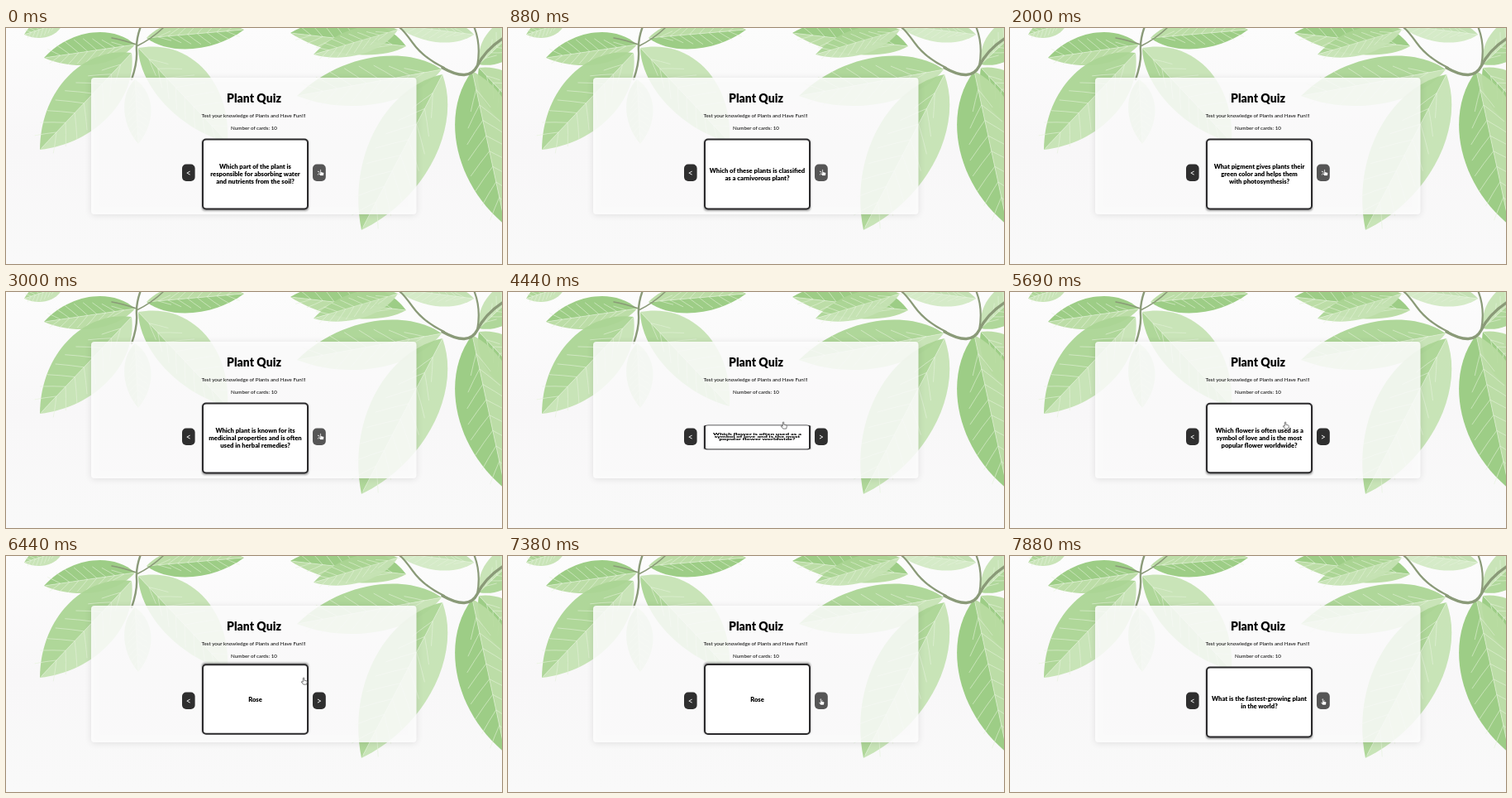
These frames come from a looping animation (600 px wide and 285 px high, 8000 ms). An HTML page:

```html
<!DOCTYPE html>
<html lang="en">
<head>
<meta charset="utf-8">
<title>Plant Quiz</title>
<style>
  html, body { margin: 0; width: 100%; height: 100%; overflow: hidden; background: #f9f8f9; }
  svg { display: block; width: 600px; height: 285px; }
  text { font-family: Lato, "Open Sans", sans-serif; text-anchor: middle; fill: #000; }
  .title { font-size: 14px; font-weight: 900; }
  .info { font-size: 6.25px; }
  .card text { font-size: 7.65px; font-weight: 900; }
  .btn rect { fill: #2f2f2f; }
  .btn.hover rect { fill: #565656; }
  .btn text { fill: #fff; font-size: 10.5px; }
</style>
</head>
<body>
<svg viewBox="0 0 600 285">
  <defs>
    <linearGradient id="sky" x2="0" y2="1">
      <stop offset="0" stop-color="#fcfcfc"/>
      <stop offset=".5" stop-color="#f8f7f8"/>
      <stop offset="1" stop-color="#f9f9f9"/>
    </linearGradient>
    <filter id="soft" x="-10%" y="-20%" width="120%" height="140%"><feGaussianBlur stdDeviation="4"/></filter>
    <filter id="lift" x="-10%" y="-10%" width="120%" height="120%"><feGaussianBlur stdDeviation="1.1"/></filter>
  </defs>
  <rect width="600" height="285" fill="url(#sky)"/>
  <g id="leaves"></g>
  <g fill="none" stroke="#8a9a78" stroke-linecap="round">
    <path stroke-width="2.4" d="M163 -2Q157 14 158 28T152 62"/>
    <path stroke-width="1.6" d="M158 22Q175 14 190 0M158 20Q140 14 128 12"/>
    <path stroke-width="3.4" d="M602 12Q580 26 570 46T528 48"/>
    <path stroke-width="2.2" d="M530 48Q505 36 492 18T474 -2M570 46Q575 20 566 -2"/>
  </g>
  <rect x="103" y="61" width="393.5" height="165" rx="4" fill="#000" opacity=".1" filter="url(#soft)"/>
  <rect x="103" y="60" width="393.5" height="165" rx="4" fill="#fff" opacity=".84"/>
  <text class="title" x="300" y="90.3">Plant Quiz</text>
  <text class="info" x="299.7" y="108.2">Test your knowledge of Plants and Have Fun!!!</text>
  <text class="info" x="300" y="123.2">Number of cards: 10</text>
  <g class="btn"><rect x="213" y="164.5" width="15.6" height="20.5" rx="5"/><text x="220.8" y="178.6">&lt;</text></g>
  <g class="btn" id="next"><rect x="371" y="164.5" width="15.8" height="20.5" rx="5"/><text x="378.9" y="178.6">&gt;</text></g>
  <g class="card" id="card">
    <rect x="-64.5" y="-40" width="129" height="86" rx="4" opacity=".4" filter="url(#lift)"/>
    <rect x="-63.5" y="-40.25" width="127" height="84" rx="4" fill="#fff" stroke="#2b2a2c" stroke-width="2"/>
    <g id="front"></g>
    <g id="back" transform="scale(1 -1)"><text y="1">Rose</text></g>
  </g>
  <path id="hand" fill="#fff" stroke="#444" stroke-width=".7" stroke-linejoin="round"
    d="M-1.7 -3.6q.8-.9 1.5 0v2.8l2.8.7q.9.3.7 1.4l-.6 2.8h-4l-2.5-3.1q.6-1 2.1.2z"/>
</svg>
<script>
const LOOP = 8000, STEP = 62.5, AXIS = 174.75, FLIP = 600;
const $ = id => document.getElementById(id);

// base x, base y, tip x, tip y, side widths, tone
const LEAVES = [
  [70, -8, 22, 8, .3, .3, 1],
  [156, 62, 160, 140, .3, .25, 2],
  [156, 20, 46, 36, .2, .26, 0],
  [152, 30, 41, 147, .27, .3, 1],
  [170, 12, 288, 2, .2, .2, 0],
  [160, 24, 268, 138, .34, .2, 1],
  [484, 22, 344, 6, .16, .24, 0],
  [474, 2, 372, 32, .2, .2, 1],
  [566, 8, 470, -4, .2, .2, 2],
  [572, 44, 640, -20, .3, .3, 1],
  [527, 50, 352, 82, .2, .22, 1],
  [528, 56, 430, 244, .24, .26, 1],
  [572, 48, 650, 130, .3, .3, 0],
  [564, 52, 604, 238, .27, .26, 0]
];
const TONES = [['#b9dca2', '#98cb7f'], ['#c6e3b4', '#abd594'], ['#d3eac5', '#c1e0b0']];

function leaf([x, y, tx, ty, a, b, tone]) {
  const len = Math.hypot(tx - x, ty - y);
  const turn = Math.atan2(ty - y, tx - x) * 180 / Math.PI;
  const half = w => `M0 0C${.22 * len} ${w * len} ${.68 * len} ${w * len} ${len} 0Z`;
  let veins = `M0 0H${len * .98}`;
  for (let u = .12; u < .85; u += .1) {
    const reach = 2.3 * u * (1 - u);
    for (const w of [-a, b])
      veins += `M${u * len} 0q${.06 * len} ${w * reach * len * .5} ${.13 * len} ${w * reach * len}`;
  }
  const [light, dark] = TONES[tone];
  return `<g transform="translate(${x} ${y}) rotate(${turn})" opacity=".94">
    <path d="${half(-a)}" fill="${light}"/><path d="${half(b)}" fill="${dark}"/>
    <path d="${veins}" fill="none" stroke="#e3f2d8" stroke-width=".8" opacity=".7"/></g>`;
}
$('leaves').innerHTML = LEAVES.map(leaf).join('');

const CARDS = [
  [0, 'Which part of the plant is|responsible for absorbing water|and nutrients from the soil?'],
  [875, 'Which of these plants is classified|as a carnivorous plant?'],
  [1437, 'What is the process by which|plants use sunlight to make|their own food called?'],
  [2000, 'What pigment gives plants their|green color and helps them|with photosynthesis?'],
  [2562, 'Which part of the plant is|responsible for producing|seeds and fruit?'],
  [3000, 'Which plant is known for its|medicinal properties and is often|used in herbal remedies?'],
  [3500, 'Which flower is often used as a|symbol of love and is the most|popular flower worldwide?'],
  [7375, 'What is the fastest-growing plant|in the world?']
];
const FLIPS = [4293, 5233, 5983, 7358];
const PATH = [
  [0, 381.5, 174.5], [3600, 381.5, 174.5], [4125, 334, 161], [6240, 334, 161],
  [6437, 361, 151], [6750, 374, 166], [7100, 379.5, 176], [LOOP, 379.5, 176]
];

// CSS "ease" curve
function ease(x) {
  if (x <= 0 || x >= 1) return x <= 0 ? 0 : 1;
  let lo = 0, hi = 1, s;
  for (let i = 0; i < 24; i++) {
    s = (lo + hi) / 2;
    const at = .75 * s * (1 - s) + s ** 3;
    if (at < x) lo = s; else hi = s;
  }
  return .3 * s * (1 - s) ** 2 + 3 * s * s * (1 - s) + s ** 3;
}

function handAt(t) {
  const i = PATH.findIndex(p => p[0] > t);
  const [t0, x0, y0] = PATH[i - 1], [t1, x1, y1] = PATH[i];
  const u = (t - t0) / (t1 - t0), k = u * u * (3 - 2 * u);
  return [x0 + (x1 - x0) * k, y0 + (y1 - y0) * k];
}

let shown = '';
function setQuestion(text) {
  if (text === shown) return;
  shown = text;
  const lines = text.split('|'), top = 4.4 - 4.5 * (lines.length - 1);
  $('front').innerHTML = lines.map((s, i) => `<text y="${top + 9 * i}">${s}</text>`).join('');
}

function draw(t) {
  setQuestion(CARDS.filter(c => c[0] <= t).pop()[1]);
  const turn = FLIPS.reduce((sum, at, i) => sum + (i % 2 ? -1 : 1) * ease((t - at) / FLIP), 0);
  const c = Math.cos(turn * Math.PI);
  $('card').setAttribute('transform', `translate(301.5 ${AXIS}) scale(1 ${c})`);
  $('front').style.display = c >= 0 ? '' : 'none';
  $('back').style.display = c < 0 ? '' : 'none';
  const [x, y] = handAt(t);
  $('hand').setAttribute('transform', `translate(${x} ${y})`);
  $('next').classList.toggle('hover', x > 371 && y > 164);
}

const start = performance.now();
function tick() {
  const t = (performance.now() - start) % LOOP;
  draw(Math.min(Math.floor((t + 3) / STEP) * STEP, LOOP - STEP));
  requestAnimationFrame(tick);
}
tick();
</script>
</body>
</html>
```
